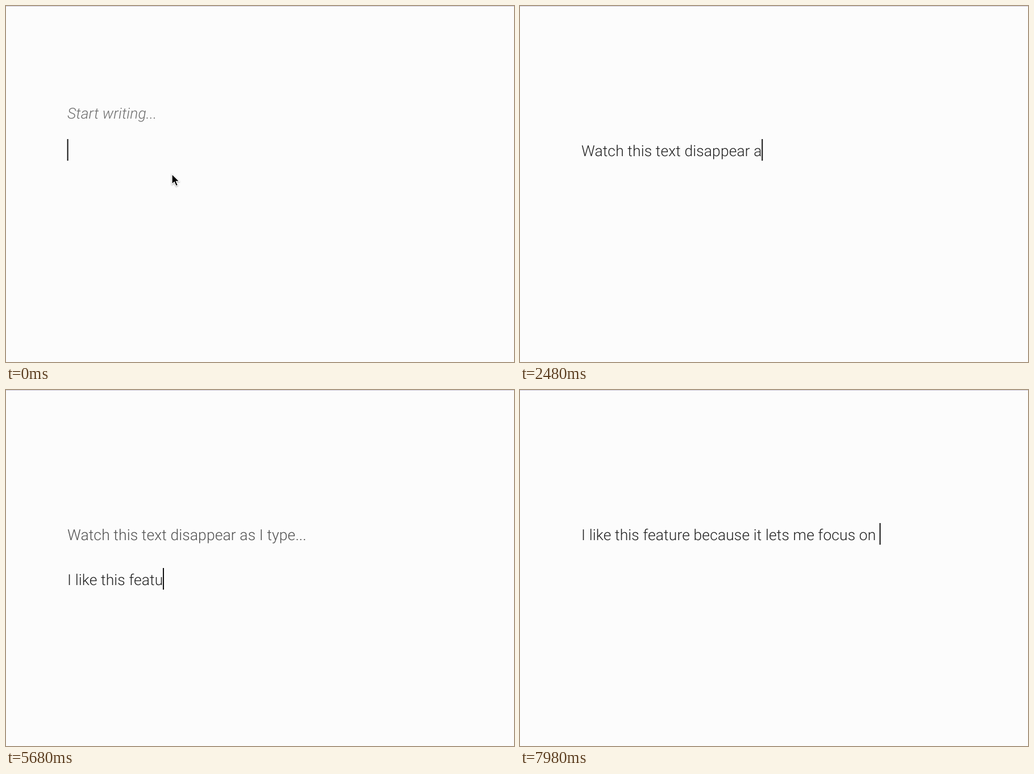
Write an HTML page that moves like this. It is 894x626 px and loops after 8 s.

```html
<!DOCTYPE html>
<html lang="en">
<head>
<meta charset="utf-8">
<title>Fading lines</title>
<style>
  html, body { margin: 0; width: 100%; height: 100%; overflow: hidden; background: #fcfcfc; }
  #stage { position: relative; width: 894px; height: 626px; overflow: hidden; background: #fcfcfc; }
  #stage::before { content: ""; position: absolute; left: 0; top: 0; width: 100%; height: 1px; background: #cfcbdc; }
  .line {
    position: absolute; left: 108px; white-space: pre; color: #222;
    font: 300 26.5px/38px Roboto, "Open Sans", sans-serif;
    letter-spacing: .1px; text-rendering: geometricPrecision;
  }
  #hint { top: 171px; color: #707070; font-style: italic; }
  #first { top: 237px; }
  #second { top: 316px; }
  #caret { position: absolute; left: 0; top: 0; width: 1.6px; height: 38px; background: #111; }
  #pointer { position: absolute; left: 288px; top: 292px; filter: drop-shadow(0 1px 1px rgba(0,0,0,.35)); }
</style>
</head>
<body>
<div id="stage">
  <div class="line" id="hint">Start writing...</div>
  <div class="line" id="first"></div>
  <div class="line" id="second"></div>
  <div id="caret"></div>
  <svg id="pointer" width="24" height="32">
    <path d="M4 3.5V21.5L8.2 17.6L11.2 24.5L14.4 23.1L11.5 16.4H17Z" fill="#000" stroke="#fff" stroke-width="1.3"/>
  </svg>
</div>
<script>
const LOOP = 8000;
const NEW_LINE = 3750;
const POINTER_HIDES = 850;
const LINE_STEP = 79;
const CARET_TOP = 234;

const FIRST_TEXT = "Watch this text disappear as I type...";
const SECOND_TEXT = "I like this feature because it lets me focus on ";

// Each row is [time in ms, value].
const FIRST_TYPED = [[800, 0], [1740, 18], [2480, 27], [3250, 38]];
const SECOND_TYPED = [[4100, 0], [4480, 2], [5680, 17], [6780, 37], [7380, 42], [7980, 48]];
const HINT_FADE = [[1300, 1], [1740, .95], [2380, 0]];
const FIRST_FADE = [[4800, 1], [5680, .78], [6300, 0]];
const SCROLL = [[6300, 0], [6460, 1]];

const [hint, first, second, caret, pointer] =
  ["hint", "first", "second", "caret", "pointer"].map(id => document.getElementById(id));

function valueAt(steps, t) {
  if (t <= steps[0][0]) return steps[0][1];
  for (let i = 1; i < steps.length; i++) {
    const [t0, a] = steps[i - 1], [t1, b] = steps[i];
    if (t <= t1) return a + (b - a) * (t - t0) / (t1 - t0);
  }
  return steps[steps.length - 1][1];
}

function typeInto(line, text, steps, t) {
  const typed = text.slice(0, Math.floor(valueAt(steps, t) + .01));
  if (line.textContent !== typed) line.textContent = typed;
}

function draw(t) {
  typeInto(first, FIRST_TEXT, FIRST_TYPED, t);
  typeInto(second, SECOND_TEXT, SECOND_TYPED, t);
  hint.style.opacity = valueAt(HINT_FADE, t);
  first.style.opacity = valueAt(FIRST_FADE, t);
  pointer.style.visibility = t < POINTER_HIDES ? "visible" : "hidden";

  const p = valueAt(SCROLL, t);
  const shift = -LINE_STEP * p * p * (3 - 2 * p);
  second.style.transform = shift ? `translateY(${shift}px)` : "none";

  const onSecond = t >= NEW_LINE;
  const x = 107.6 + (onSecond ? second : first).getBoundingClientRect().width;
  const y = CARET_TOP + (onSecond ? LINE_STEP + shift : 0);
  caret.style.transform = `translate(${x}px, ${y}px)`;
}

const start = performance.now();
function tick() {
  draw((performance.now() - start) % LOOP);
  requestAnimationFrame(tick);
}
tick();
</script>
</body>
</html>
```
